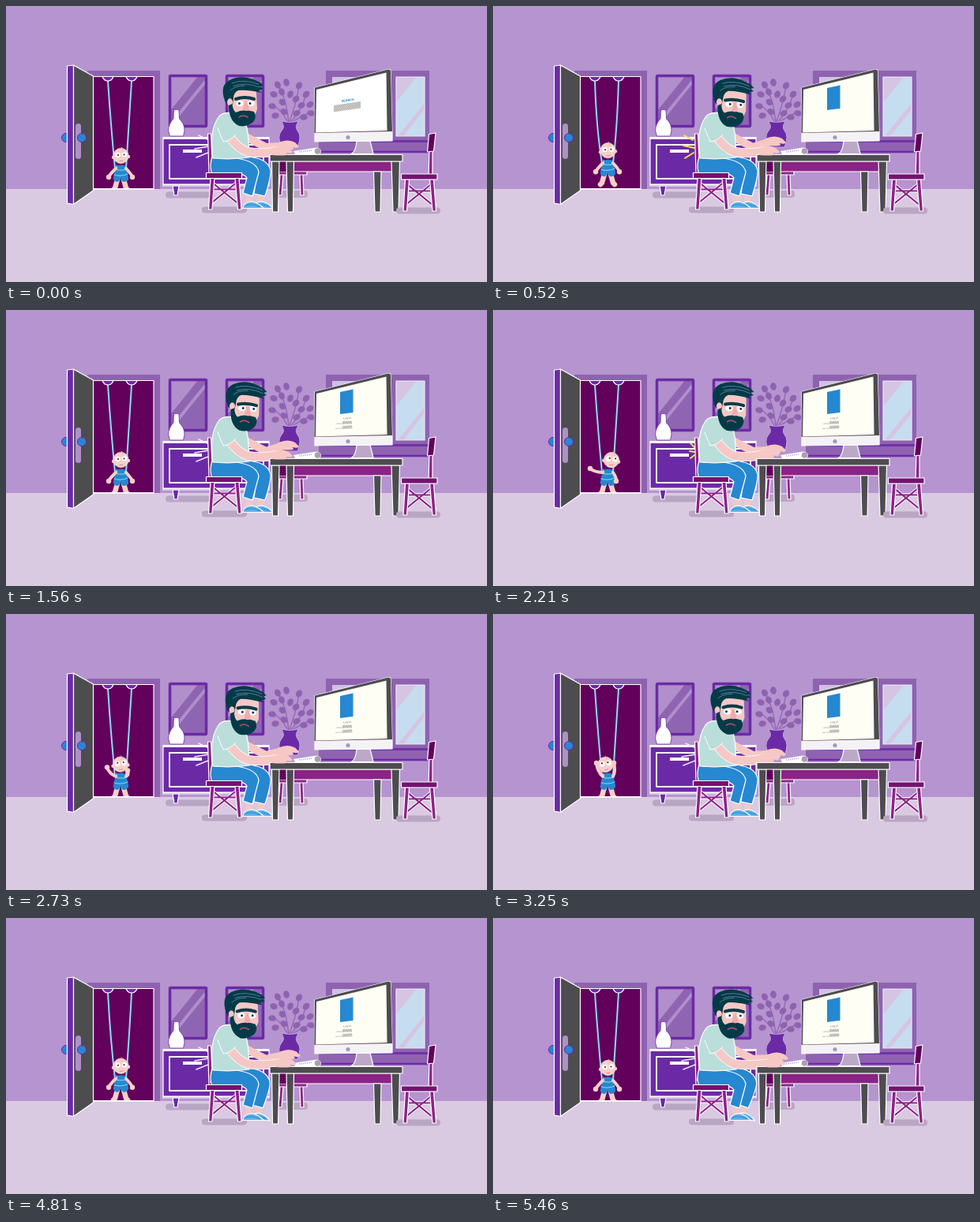
An HTML page for the animation above (5590 ms loop, 609 by 350 pixels).

```html
<!DOCTYPE html>
<html lang="en">
<head>
<meta charset="utf-8">
<title>Working from home</title>
<style>
html, body { margin: 0; width: 100%; height: 100%; overflow: hidden; background: #b594cf; }
svg { display: block; width: 100%; height: 100%; }
text { font-family: Inter, Arial, sans-serif; }
.o { stroke: #fff; stroke-width: 1.2; stroke-linejoin: round; }
.n { fill: none; stroke-linecap: round; stroke-linejoin: round; }
</style>
</head>
<body>
<svg viewBox="0 0 609 350">
  <defs>
    <pattern id="hatch" width="2" height="2" patternUnits="userSpaceOnUse" patternTransform="rotate(35)">
      <rect width="2" height="2" fill="#dedbd8"/><rect width="1" height="2" fill="#aaa6a4"/>
    </pattern>
    <clipPath id="doorway"><path d="M104 88H187V232H104Z"/></clipPath>
    <g id="mirror">
      <rect x="207.500" y="88.500" width="46" height="64" rx="1" fill="#8f65b3" stroke="#6b2aa5" stroke-width="3.500"/>
      <path d="M209.500 90.500H242L209.500 131ZM211 144L251.500 94V100L213 148Z" fill="#b08fcb"/>
    </g>
    <g id="slipper">
      <path d="M299.500 256.500Q302 248 312 248Q321 250 326 256.500Z" fill="#5fb0e8" class="o"/>
      <path d="M303 253Q312 250 321 254.500" class="n" stroke="#2688d0"/>
    </g>
    <g id="chairLegs">
      <path id="brace" d="M7 14.500H40M7 5L39 31M40 5L8 31" class="n" stroke="#fff" stroke-width="3.800"/>
      <path d="M7 14.500H40M7 5L39 31M40 5L8 31" class="n" stroke="#8b2386" stroke-width="2.200"/>
      <path d="M6 0H11L8 40H3.500ZM37 0H42L45 40H40.500Z" fill="#8b2386" class="o"/>
    </g>
  </defs>

  <path d="M0 0H609V233H0Z" fill="#b594cf"/>
  <path d="M0 232H609V350H0Z" fill="#d9c9e1"/>

  <!-- window and mirrors -->
  <path d="M405 82H536V171H405Z" fill="#8f62b1"/>
  <path d="M413 90H485V165H413Z" fill="#d3bfe1"/>
  <path d="M494 90H530V165H494Z" fill="#c6dcef"/>
  <path d="M494 90H520L494 122ZM496 165L530 123V131L503 165Z" fill="#d6c4e3"/>
  <path d="M494 90H530V165H494Z" class="n" stroke="#efe7f5" stroke-width="1.200"/>
  <path d="M396 170H538V186H396Z" fill="#8f62b1"/>
  <path d="M396 171.500H538M396 185H538" stroke="#6b2aa5" stroke-width="2.500"/>
  <use href="#mirror"/><use href="#mirror" x="72"/>

  <!-- doorway -->
  <path d="M103 82H195V232H103Z" fill="#8f62b1"/>
  <path d="M108 89.500H187V232H108Z" fill="#62005c" class="o"/>
  <g id="ropes" class="n" stroke="#8adcf5" stroke-width="2"><path/><path/></g>
  <g fill="#6b2aa5" class="o">
    <path d="M122 89.500H136Q134 95 129 95Q124 95 122 89.500Z"/>
    <path d="M152 89.500H166Q164 95 159 95Q154 95 152 89.500Z"/>
  </g>
  <g clip-path="url(#doorway)">
    <g id="baby">
      <g class="n" stroke="#f8cfc8" stroke-width="6.500">
        <path d="M141 220L138 231L136 233"/><path d="M149 220L152 231L154 233"/>
      </g>
      <path d="M139 203Q146 200 152 203L155 217Q156 223 148 223L145 219L142 223Q135 223 136 217Z" fill="#2688d0"/>
      <path d="M140 202L141 208H150L152 202M137 214Q145 217 154 213" class="n" stroke="#8adcf5"/>
      <g id="babyHead">
        <g fill="#f8cfc8">
          <circle cx="136" cy="192" r="2.200"/><circle cx="155" cy="191" r="2.200"/>
          <ellipse cx="145.500" cy="190" rx="9.700" ry="9.700" stroke="#fbe6e1" stroke-width=".6"/>
        </g>
        <path d="M146 179Q150 181 147 184" class="n" stroke="#e7a5a2" stroke-width=".8"/>
        <g fill="#fff"><circle cx="141.500" cy="189" r="3.300"/><circle cx="150" cy="188.500" r="3.300"/></g>
        <g id="babyEyes" fill="#23303a"><circle cx="142" cy="189" r="1.100"/><circle cx="149.500" cy="188.500" r="1.100"/></g>
        <path d="M144 196.500Q146 197.500 148 196" class="n" stroke="#dc7f86" stroke-width=".9"/>
      </g>
      <g id="babyArms" class="n" stroke="#f8cfc8" stroke-width="4"><path/><path/></g>
      <g id="babyHands" fill="#f8cfc8"><circle r="3.200"/><circle r="3.200"/></g>
    </g>
  </g>
  <path d="M110 232H187" stroke="#fff" stroke-width="1.400"/>

  <!-- open door -->
  <circle cx="76" cy="167" r="5.500" fill="#2688d0" stroke="#6b2aa5"/>
  <path d="M77.500 76L85.500 75V251.500L77.500 250Z" fill="#6b2aa5" class="o"/>
  <path d="M85.500 75L110.500 89V234L85.500 251.500Z" fill="#4d4c4f" class="o"/>
  <rect x="88" y="149" width="7" height="45" rx="3.500" fill="#b08fcb"/>
  <circle cx="96" cy="167" r="5.500" fill="#2688d0" stroke="#6b2aa5"/>

  <!-- sideboard -->
  <rect x="202" y="235.500" width="62" height="8" rx="4" fill="#b8a6c2"/>
  <rect x="338" y="234" width="44" height="9" rx="4" fill="#b8a6c2"/>
  <path d="M211 228H219L217 240H213Z" fill="#6b2aa5" class="o"/>
  <path d="M199 166.500H333V228H199Z" fill="#6b2aa5" class="o"/>
  <path d="M199 168H333M199 226.500H333" stroke="#fff" stroke-width="2"/>
  <path d="M207 176H326V219H207Z" class="n" stroke="#fff" stroke-width="1.800"/>
  <path d="M224 184H248" stroke="#fff" stroke-width="4"/>
  <path id="ajar" d="M244 164L257 170M239 181L257 178M241 192L256 186" class="n" stroke="#efe7f5" stroke-width="1.600"/>
  <path id="sparks" class="n" stroke="#fbe04e" stroke-width="1.800"/>
  <path d="M212.500 132Q216 130.500 219 132L219.500 143Q226 149 226 158L224.500 165H207.500L205.500 158Q206 149 212 143Z" fill="#fff" stroke="#6b2aa5" stroke-width=".8"/>

  <!-- plant -->
  <g id="plant" fill="#8f62b1"></g>
  <path d="M348.500 146Q359 149 370.500 146Q365 153 369 158Q375 165 369 179H350Q342 166 349 158Q354 153 348.500 146Z" fill="#6b2aa5" stroke="#c5a9da"/>

  <!-- rear chair -->
  <path d="M342 209H381V214H342ZM347 214H351L349 240H345ZM372 214H376L377 240H373Z" fill="#8b2386" class="o"/>

  <!-- man's chair -->
  <rect x="248" y="254.500" width="57" height="8" rx="4" fill="#b8a6c2"/>
  <path d="M255.500 162H259.500L262 213H257Z" fill="#8b2386" class="o"/>
  <use href="#chairLegs" x="253" y="218"/>

  <!-- man -->
  <g id="man">
    <g id="farLeg">
      <path d="M318 236L319 252H326L326 236Z" fill="#f6c8c5"/>
      <path d="M262 193L303 191Q331 192 335 208Q336 216 328 241L314 238L317 218Q315 213 298 213H260Z" fill="#2688d0" class="o"/>
      <use href="#slipper" x="12"/>
    </g>
    <path d="M303 234L304 252H311L312 236Z" fill="#f6c8c5"/>
    <path d="M261 191L292 193Q318 197 320 211L312 241L300 237L305 218Q301 212 290 213H261Q257 204 261 191Z" fill="#2688d0" class="o"/>
    <use href="#slipper"/>
    <path d="M253.500 211.500H298.500V218.500H253.500Z" fill="#75116f" class="o"/>
    <g id="torso">
      <path id="farArm" class="n" stroke="#f6c8c5" stroke-width="10"/>
      <path d="M269 141Q276 131 301 139Q306 155 307 170L308 192Q285 195 262 193Q257 158 269 141Z" fill="#bbdeda" class="o"/>
      <path id="armEdge" class="n" stroke="#fff" stroke-width="12"/>
      <path id="nearArm" class="n" stroke="#f6c8c5" stroke-width="10.500"/>
      <path d="M268 143Q279 143 284 154L291 163Q283 172 275 172Q266 158 268 143Z" fill="#bbdeda"/>
      <path d="M291 163Q283 172 275 172L268 155" class="n" stroke="#fff"/>
    </g>
    <g id="head">
      <path d="M284 112Q284 103 300 104Q315 103 317 110L318 131Q314 145 300 145Q286 144 284 130Z" fill="#f6c8c5"/>
      <path d="M277 120Q270 101 283 94Q297 87 313 93L322 97L326 101L321 102L326 105L320 107L323 110Q306 106 294 107Q288 110 288 117L287 125H281Q278 124 277 120Z" fill="#023b47"/>
      <path d="M286 98Q300 92 320 99M288 101.500Q303 96 321 103M284 107Q290 101 302 101" class="n" stroke="#7f8fb8" stroke-width=".7"/>
      <ellipse cx="283.500" cy="122" rx="3.500" ry="4.700" fill="#f6c8c5"/>
      <path d="M282 126L286.500 124Q287 132 291 135Q300 130 314 134Q318 141 313 147Q305 154 295 152Q282 146 282 126Z" fill="#023b47"/>
      <path d="M295 141Q300 137 306 141" class="n" stroke="#b64b75" stroke-width="1.600"/>
      <ellipse cx="296" cy="123.500" rx="4.600" ry="3.800" fill="#fff"/><ellipse cx="310" cy="123.500" rx="4.600" ry="3.800" fill="#fff"/>
      <g id="eyes" fill="#023b47"><circle cx="296" cy="123.500" r="1.500"/><circle cx="309.500" cy="123.500" r="1.500"/></g>
      <path d="M302 121L300 131Q304 135 308 131Q307 127 305 121Z" fill="#f2abad"/>
      <path id="brow" class="n" stroke="#023b47" stroke-width="4"/>
    </g>
  </g>

  <!-- table -->
  <path d="M339 197H498V210H339Z" fill="#8b2386" class="o"/>
  <path d="M339 197H355V210H339Z" fill="#62005c"/>
  <g fill="#4d4c4f" class="o">
    <path d="M355 197H364.500L363.500 261H356.500ZM465.500 210H475L474 261H467Z"/>
    <path d="M336.500 197H346L344.500 261H337.500ZM488 197H498.500L497 261H490Z"/>
    <path d="M334 188.500H502V197H334Z"/>
  </g>

  <!-- computer -->
  <path d="M444 171H461L465 187.500H437Q443 185 444 171Z" fill="#bca9c9" class="o"/>
  <path d="M391 103.500L484 80.500Q487 80 487 83L489 161V171L391 172Z" fill="#f5f2f5" class="o"/>
  <path d="M391 103.500L484 80.500Q487 80 487 83L489 159L390.500 161Z" fill="#4d4c4f"/>
  <path id="screen" d="M393 106L481.500 84.500L482.500 158L392 160.500Z"/>
  <circle cx="433" cy="166.500" r="2.600" fill="#a89bb1"/>
  <g id="search">
    <text transform="translate(425 122) rotate(-8)" font-size="3.900" font-weight="700" fill="#2688d0">SEARCH</text>
    <path d="M415 126L449 121V129.500L415 134.500Z" fill="url(#hatch)"/>
  </g>
  <path id="badge" d="M423 104L439.500 100.500V130L423 132Z" fill="#2688d0"/>
  <g id="login">
    <text transform="translate(427 138.500) rotate(-3)" font-size="3.600" fill="#6d6d78">Log in</text>
    <g font-size="2.200" fill="#77757c">
      <text transform="translate(417.500 145) rotate(-3)">username</text>
      <text transform="translate(417.500 151) rotate(-3)">password</text>
    </g>
    <g id="fields" fill="url(#hatch)"><rect x="426" y="141" height="3.800"/><rect x="426" y="147" height="3.800"/></g>
  </g>
  <path d="M364 184L393 179.500Q399 180 399 185Q398 189 393 188.500L366 188Z" fill="#fff"/>
  <path d="M371 185L387 183" stroke="#c9c1cf" stroke-width="2" stroke-dasharray="1.500 1"/>
  <circle cx="394.500" cy="184" r="3.800" fill="#aaa0b0"/>
  <g id="hands" fill="#f6c8c5"><path/><path/></g>

  <!-- right chair -->
  <rect x="494" y="255.500" width="56" height="8" rx="4" fill="#b8a6c2"/>
  <path d="M536 182H540L540 216H535Z" fill="#8b2386" class="o"/>
  <use href="#chairLegs" x="499.500" y="220"/>
  <path d="M535.500 162.500L544 161L541.500 184L533.500 185Z" fill="#62005c" class="o"/>
  <path d="M500.500 213H546V220H500.500Z" fill="#75116f" class="o"/>
</svg>

<script>
const STEP = 130, STEPS = 43;
const $ = id => document.getElementById(id);
const set = (el, attrs) => { for (const k in attrs) el.setAttribute(k, attrs[k]); };
const show = (el, on) => el.setAttribute('visibility', on ? 'visible' : 'hidden');

// Leaves: x, y, angle
const leaves = [
  [344, 100, 60], [355, 97, 80], [371, 101, -60], [339, 112, 25], [349, 109, 65],
  [360, 112, -70], [380, 112, -45], [367, 118, -50], [337, 127, 10], [350, 122, 40],
  [374, 126, -30], [385, 125, -35], [341, 139, -10], [352, 134, 30], [368, 136, -30],
  [386, 136, 10], [377, 141, 0]
];
$('plant').innerHTML =
  '<path d="M358 149Q356 120 345 101M358 148Q366 130 371 102M359 148Q372 137 380 113M357 148Q350 132 338 126M359 149Q370 142 386 134" class="n" stroke="#8f62b1" stroke-width="1.200"/>' +
  leaves.map(([x, y, a]) => `<ellipse rx="4.800" ry="3.800" transform="translate(${x} ${y}) rotate(${a})"/>`).join('');

// Rows: step, then values; linear in between
function mix(rows, i) {
  let k = 1;
  while (k < rows.length - 1 && rows[k][0] < i) k++;
  const a = rows[k - 1], b = rows[k];
  const p = Math.min(1, Math.max(0, (i - a[0]) / (b[0] - a[0])));
  return a.slice(1).map((v, j) => v + (b[j + 1] - v) * p);
}

// step, left hand x y, right hand x y, head dx dy angle
const babyPose = [
  [0, 130, 217, 160, 217, 0, 0, 0], [14, 130, 217, 160, 217, 0, 0, 0],
  [16, 123, 206, 158, 217, 3, 0, 7], [17, 123, 201, 156, 217, 3, 0, 8],
  [19, 122, 205, 156, 217, 3, 0, 8], [22, 131, 189, 153, 189, -2, 1, -6],
  [34, 131, 189, 153, 189, -2, 1, -6], [37, 130, 217, 160, 217, 0, 0, 0],
  [43, 130, 217, 160, 217, 0, 0, 0]
];
// step, head tilt, gaze x, lean
const manPose = [
  [0, 0, -.5, 0], [1, 0, -.5, 0], [3, 1, 1.5, 0], [20, 1, 1.5, 0], [25, .2, -1, 0],
  [28, 0, 1, 0], [34, 0, 1, 0], [39, .3, 1, 1], [42, .3, 1, 1], [43, 0, -.5, 0]
];

function drawBaby(i) {
  const [lx, ly, rx, ry, hx, hy, ha] = mix(babyPose, i);
  const lift = i <= 12 || i >= 36 ? 4.500 * (1 - Math.cos(i * Math.PI / 3)) : 0;
  set($('baby'), { transform: `translate(0 ${-lift})` });
  set($('babyHead'), { transform: `translate(${hx} ${hy}) rotate(${ha} 145 200)` });
  set($('babyEyes'), { transform: ha ? `translate(${ha / 8} -1)` : '' });
  const arms = $('babyArms').children, hands = $('babyHands').children;
  [[139, 206, lx, ly, -3], [152, 206, rx, ry, 3]].forEach(([x, y, tx, ty, out], k) => {
    set(arms[k], { d: `M${x} ${y}Q${(x + tx) / 2 + out} ${(y + ty) / 2 + 2} ${tx} ${ty}` });
    set(hands[k], { cx: tx, cy: ty });
  });
  const ropes = $('ropes').children, y = 206 - lift;
  set(ropes[0], { d: `M129 95Q${133 - lift / 3} 155 138 ${y}` });
  set(ropes[1], { d: `M159 95Q${155 + lift / 3} 155 152 ${y}` });
}

function drawMan(i) {
  const [tilt, gaze, lean] = mix(manPose, i);
  set($('head'), { transform: `translate(${tilt * 2 + lean * 2} ${tilt}) rotate(${tilt * 4} 298 135)` });
  set($('eyes'), { transform: `translate(${gaze} 0)` });
  set($('brow'), { d: `M291 ${118 + tilt}Q302 ${114 + tilt * 2} 314 ${118 + tilt}` });
  set($('farLeg'), { transform: `rotate(${lean * 6} 328 196)` });

  const tap = i <= 1 || (i >= 29 && i <= 33) ? 0 : Math.cos(i * Math.PI / 4 - Math.PI);
  const up = Math.max(0, tap) * 5, down = Math.max(0, -tap) * 2;
  const fx = 357 + lean * 3, fy = 177 - up, nx = 349 + lean * 8, ny = 184 - down;
  set($('farArm'), { d: `M300 164L329 179L${fx - 9} ${fy + 1}` });
  const near = `M284 167Q294 181 306 185Q325 188 ${nx - 4} ${ny}`;
  set($('nearArm'), { d: near });
  set($('armEdge'), { d: near });
  const hand = (x, y) => `M${x - 12} ${y - 4}Q${x} ${y - 9} ${x + 9} ${y - 4}L${x + 14} ${y + 1}Q${x + 13} ${y + 4} ${x + 6} ${y + 2}L${x + 7} ${y + 5}Q${x - 3} ${y + 6} ${x - 12} ${y + 5}Z`;
  const hands = $('hands').children;
  set(hands[0], { d: hand(fx, fy) });
  set(hands[1], { d: hand(nx, ny) });
}

function drawScreen(i) {
  const page = i >= 3;
  set($('screen'), { fill: page ? '#fffef5' : '#fff' });
  show($('search'), !page);
  show($('badge'), page);
  show($('login'), i >= 8);
  [...$('fields').children].forEach((f, k) =>
    set(f, { width: 12 * Math.min(1, Math.max(0, (i - 8 - k * 2) / 2)), transform: 'rotate(-3 426 144)' }));
}

function drawSparks(i) {
  const big = i >= 3 && i <= 5, small = i >= 16 && i <= 18;
  show($('ajar'), !big && !small);
  show($('sparks'), big || small);
  set($('sparks'), { d: big ? 'M242 164L253 170M241 177L255 180M243 193L254 186' : 'M250 169L255 174M249 179L255 180M250 188L255 184' });
}

let last = -1;
function frame() {
  const i = Math.floor(performance.now() / STEP) % STEPS;
  if (i !== last) {
    last = i;
    [drawBaby, drawMan, drawScreen, drawSparks].forEach(draw => draw(i));
  }
  requestAnimationFrame(frame);
}
frame();
</script>
</body>
</html>
```
